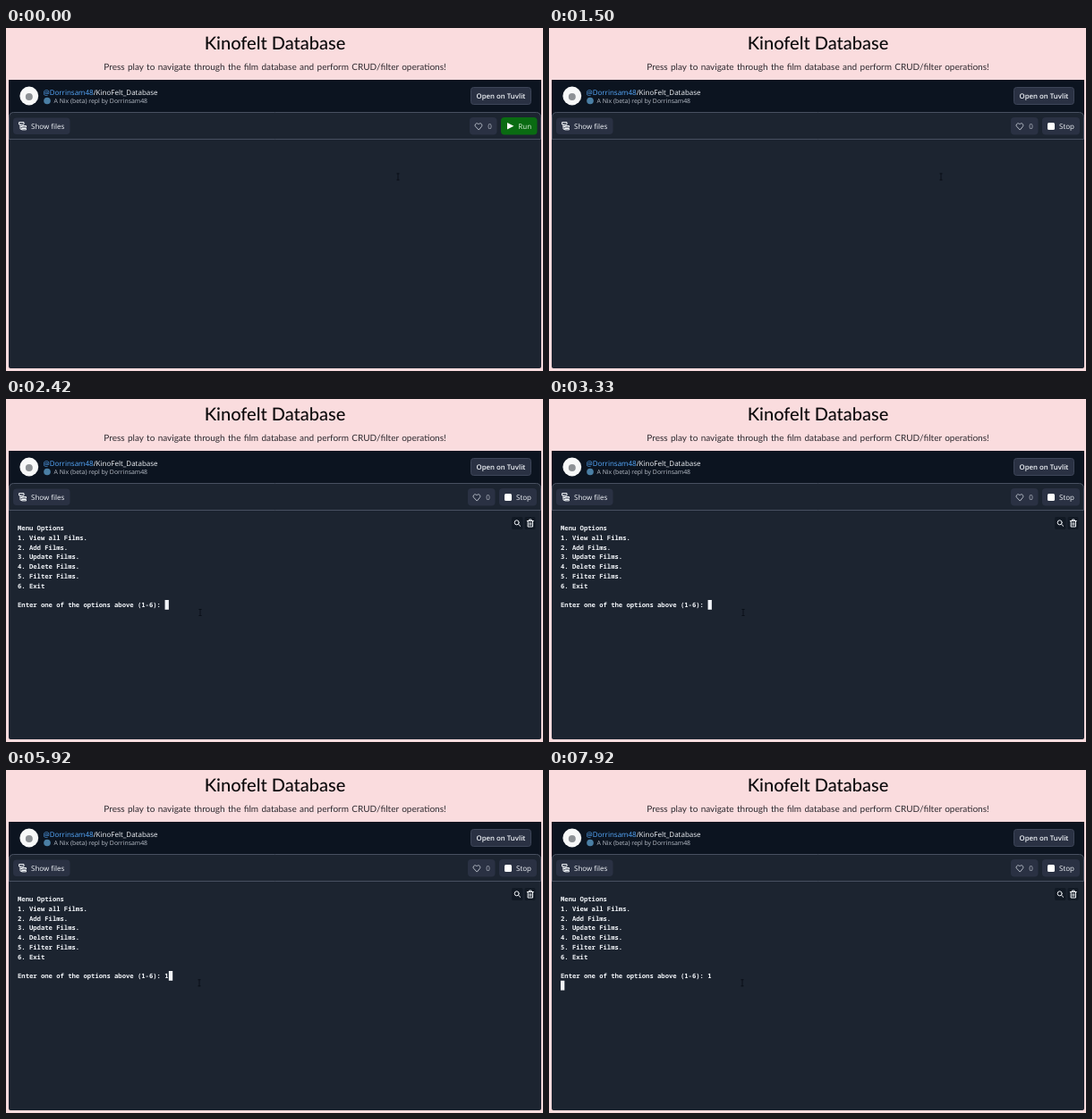
Animation, 600 px wide and 384 px high, one loop 8000 ms. Source, as an HTML page with a canvas:

```html
<!DOCTYPE html>
<html lang="en">
<head>
<meta charset="utf-8">
<title>Kinofelt Database</title>
<style>
  html, body { margin: 0; width: 100%; height: 100%; overflow: hidden; background: #fadcde; }
  canvas { display: block; width: 600px; height: 384px; }
</style>
</head>
<body>
<canvas id="stage"></canvas>
<script>
const LOOP = 8000;
const T = { stop: 670, menu: 1830, moveFrom: 1920, moveTo: 2250, focus: 2420, nudge: 4330, type: 4920, enter: 7000 };

const C = {
  page: '#fadcde', head: '#0c1420', panel: '#1c2430', button: '#2a3143',
  line: '#485060', text: '#f2f5f9', dim: '#b9bfc9', blue: '#57abff', green: '#0a6b12'
};
const UI = '"Open Sans", "Noto Sans", sans-serif';
const ROUND = 'Lato, sans-serif';
const MONO = '"Noto Sans Mono", "DejaVu Sans Mono", monospace';

const MENU = [
  'Menu Options', '1. View all Films.', '2. Add Films.', '3. Update Films.',
  '4. Delete Films.', '5. Filter Films.', '6. Exit', ''
];
const PROMPT = 'Enter one of the options above (1-6): ';
const CHAR = 4.33, ROW = 10.8, LEFT = 13, TOP = 136.4;

const canvas = document.getElementById('stage');
const ctx = canvas.getContext('2d');
const dpr = window.devicePixelRatio || 1;
canvas.width = 600 * dpr;
canvas.height = 384 * dpr;
ctx.scale(dpr, dpr);

function box(x, y, w, h, fill, r = 0, stroke) {
  ctx.beginPath();
  ctx.roundRect(x, y, w, h, r);
  if (fill) { ctx.fillStyle = fill; ctx.fill(); }
  if (stroke) { ctx.strokeStyle = stroke; ctx.lineWidth = 1; ctx.stroke(); }
}

function disc(x, y, r, fill) {
  ctx.beginPath();
  ctx.arc(x, y, r, 0, Math.PI * 2);
  ctx.fillStyle = fill;
  ctx.fill();
}

function label(str, x, y, font, fill, align = 'left') {
  ctx.font = font;
  ctx.fillStyle = fill;
  ctx.textAlign = align;
  ctx.fillText(str, x, y);
}

function stroke(path, x, y, color, width = 1) {
  ctx.save();
  ctx.translate(x, y);
  ctx.strokeStyle = color;
  ctx.lineWidth = width;
  ctx.lineCap = ctx.lineJoin = 'round';
  ctx.stroke(new Path2D(path));
  ctx.restore();
}

const HEART = 'M0 3.8 L-3.5 .2 C-5 -1.6 -2.3 -4.9 0 -2.2 C2.3 -4.9 5 -1.6 3.5 .2 Z';
const TREE = 'M0 0H5V2.5H0Z M3 4H7.5V5.6H3Z M3 7H7.5V8.4H3Z M1 2.5V7.7H3 M1 4.8H3';
const LENS = 'M2.5 0A2.5 2.5 0 1 1 -2.5 0A2.5 2.5 0 1 1 2.5 0 M1.9 1.9L4 4';
const BIN = 'M-3.5 -2.5H3.5 M-1.3 -2.5V-4H1.3V-2.5 M-2.7 -2.5V4H2.7V-2.5 M-.9 -.5V2.2 M.9 -.5V2.2';

function drawPage() {
  ctx.fillStyle = C.page;
  ctx.fillRect(0, 0, 600, 384);
  label('Kinofelt Database', 300.5, 24, '500 20px ' + ROUND, '#0c0a0c', 'center');
  ctx.wordSpacing = '0.8px';
  label('Press play to navigate through the film database and perform CRUD/filter operations!',
    300.5, 46.7, '10px ' + ROUND, '#2e292f', 'center');
  ctx.wordSpacing = '0px';
}

function drawHeader() {
  box(3, 58, 595, 60, C.head);
  disc(25.8, 76, 10.4, '#f7f8f8');
  disc(25.8, 77, 4, '#8d9195');
  const bold = '500 8px ' + UI;
  label('@Dorrinsam48', 41.5, 74.6, bold, C.blue);
  const w = ctx.measureText('@Dorrinsam48').width;
  label('/KinoFelt_Database', 41.5 + w, 74.6, bold, C.text);
  disc(46, 81.5, 3.8, '#4a7fa5');
  label('A Nix (beta) repl by Dorrinsam48', 53.5, 84, '6.9px ' + UI, C.dim);
  box(519.5, 66.5, 67, 19, C.button, 3, '#3d4558');
  label('Open on Tuvlit', 553, 79.2, '600 7.8px ' + UI, C.text, 'center');
}

function drawToolbar(running) {
  box(3, 94, 595, 287, C.panel, [5, 5, 2, 2]);
  ctx.beginPath();
  ctx.moveTo(3.5, 124);
  ctx.lineTo(3.5, 99.5);
  ctx.arcTo(3.5, 94.5, 8.5, 94.5, 5);
  ctx.arcTo(597.5, 94.5, 597.5, 99.5, 5);
  ctx.lineTo(597.5, 124.5);
  ctx.lineTo(3, 124.5);
  ctx.strokeStyle = C.line;
  ctx.lineWidth = 1;
  ctx.stroke();

  const font = '500 8px ' + UI;
  box(8, 100.5, 63.5, 18.5, C.button, 4);
  stroke(TREE, 15, 105.5, C.text);
  label('Show files', 28, 112.8, font, C.text);

  const x = running ? 516 : 518;
  box(x, 100, 30.5, 19.5, C.button, 4);
  stroke(HEART, x + 10, 110, C.dim);
  label('0', x + 20.2, 112.8, font, C.dim);

  if (running) {
    box(551, 100, 42, 19.5, C.button, 4);
    box(557, 106, 8, 8, '#ffffff', 1.5);
    label('Stop', 570, 112.8, font, C.text);
  } else {
    box(553, 100, 40.5, 19.5, C.green, 4);
    ctx.fillStyle = '#ffffff';
    ctx.fill(new Path2D('M560 106L567.4 109.7L560 113.4Z'));
    label('Run', 572.3, 112.8, font, '#dcefdc');
  }
}

function drawTerminal(t) {
  if (t < T.menu) return;
  const typed = t >= T.type ? '1' : '';
  [...MENU, PROMPT + typed].forEach((line, i) =>
    label(line, LEFT, TOP + ROW * i + 10.6, `700 ${CHAR / 0.6}px ${MONO}`, C.text));

  if (t < T.focus) return;
  const entered = t >= T.enter;
  const col = entered ? 0 : PROMPT.length + typed.length;
  const row = MENU.length + (entered ? 1 : 0);
  box(LEFT + col * CHAR, TOP + row * ROW + 2.2, CHAR, ROW, C.text);

  box(565, 132, 12.5, 14, '#111924', 2);
  box(579.5, 132, 12, 14, '#111924', 2);
  stroke(LENS, 570.7, 138.3, C.text);
  stroke(BIN, 585.8, 139, C.text);
}

function drawPointer(t) {
  const p = Math.min(1, Math.max(0, (t - T.moveFrom) / (T.moveTo - T.moveFrom)));
  const k = p * p * (3 - 2 * p);
  const x = 438 - 221 * k - (t >= T.nudge ? 1 : 0);
  const y = 166.5 + 72.5 * k - (t >= T.nudge ? 0.7 : 0);
  stroke('M-1.2 -3.5H1.2 M0 -3.5V3.5 M-1.2 3.5H1.2', x, y, '#0a0f17', 0.9);
}

function frame(now) {
  const t = now % LOOP;
  ctx.textRendering = 'geometricPrecision';
  drawPage();
  drawHeader();
  drawToolbar(t >= T.stop);
  drawTerminal(t);
  drawPointer(t);
}

const start = performance.now();
function tick() {
  frame(performance.now() - start);
  requestAnimationFrame(tick);
}
tick();
</script>
</body>
</html>
```
